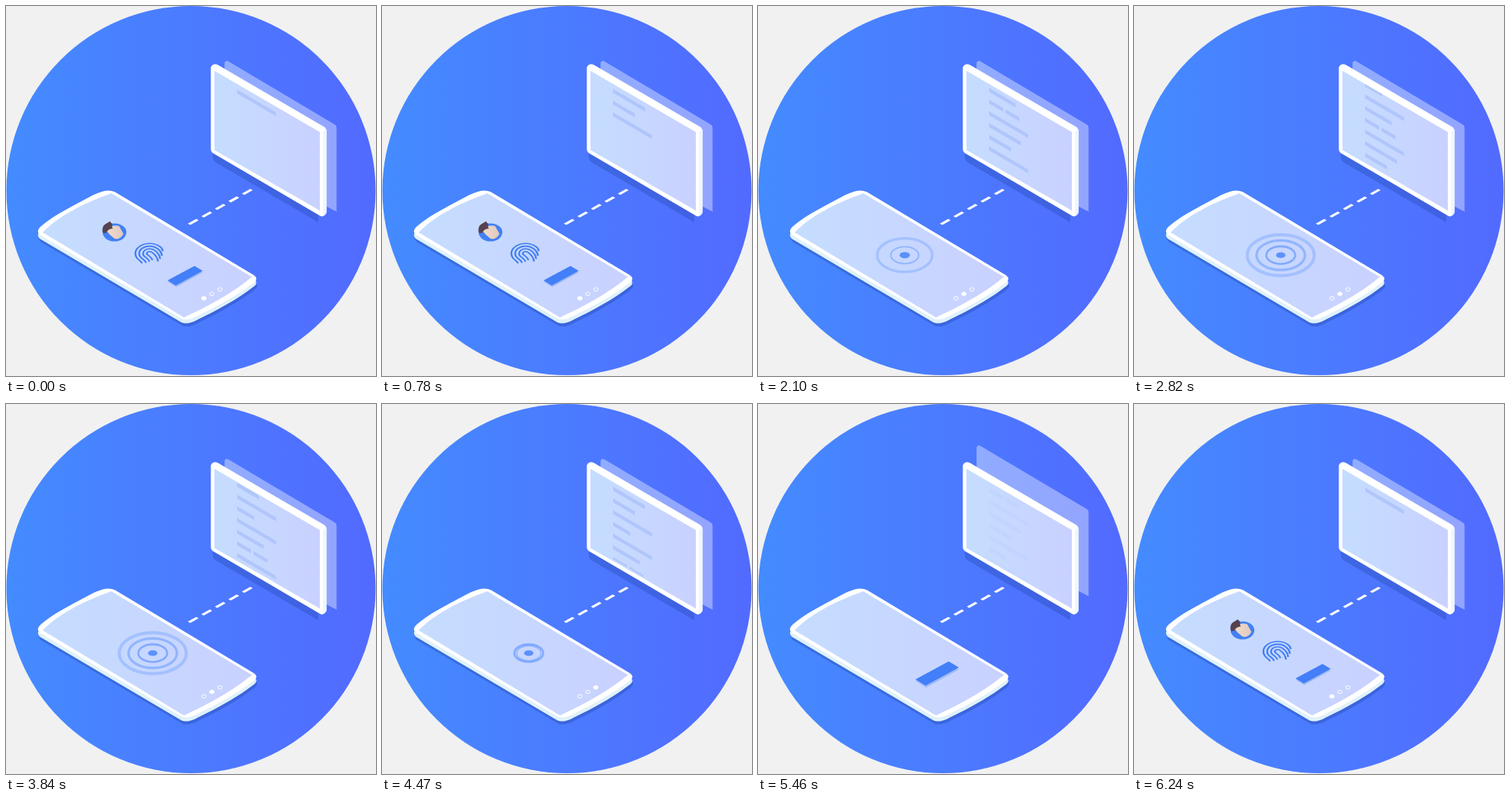
An HTML page that plays this animation: 474x474 px, repeating every 6.27 s.

```html
<!DOCTYPE html>
<html lang="en">
<head>
<meta charset="utf-8">
<title>Phone and screen</title>
<style>
html, body { margin: 0; width: 100%; height: 100%; overflow: hidden; background: #f1f1f1; }
svg { display: block; width: 100vw; height: 100vh; }
</style>
</head>
<body>
<svg viewBox="0 0 474 474">
  <defs>
    <linearGradient id="sky"><stop stop-color="#448bff"/><stop offset="1" stop-color="#526aff"/></linearGradient>
    <linearGradient id="glass"><stop stop-color="#c5ddff"/><stop offset="1" stop-color="#c9d1ff"/></linearGradient>
    <linearGradient id="skin"><stop stop-color="#f3dcc4"/><stop offset="1" stop-color="#dfc9c4"/></linearGradient>
    <path id="body" d="M43 293Q38 288 45 282C64 266 88 255 112 242Q130 233 140 238.500L317 344.500Q324 349 318 354C296 371 270 385 246 396.500Q233 404 225 400.500Z"/>
    <clipPath id="page"><path d="M294 99L348 130.300V229L294 197.700Z"/></clipPath>
  </defs>
  <circle cx="237" cy="236.500" r="236.500" fill="url(#sky)"/>

  <path d="M265 188L400 267V277L268 200Q264 197 265 188Z" fill="#1c3f9e" fill-opacity=".3"/>
  <path id="back" d="M280 180V73Q281 69 285 71L421.500 152Q423.500 153.500 423.500 156V263.500L411 257Z" fill="#fff" fill-opacity=".38"/>
  <path d="M262.400 183V79Q262.600 76 267 74.500Q269 74 272 75.800L407 154.500Q410.500 156.500 410.500 160V265Q409 268 405.500 269.500Q404 270 401 268L266 189Q262.400 187 262.400 183Z" fill="#fff"/>
  <path d="M406 161L410.500 158V265Q409 268 406 269Z" fill="#eef6ff"/>
  <path d="M267 83L402 161.500V262L267 184.500Z" fill="url(#glass)"/>
  <g clip-path="url(#page)"><g id="lines" fill="#b0c6fb"></g></g>

  <path id="dash" d="M0 0H98" transform="matrix(.84 -.468 .86 .5 234.500 279.700)" stroke="#fff" stroke-width="3.600"/>

  <use href="#body" y="9" x="1" fill="#1c3f9e" fill-opacity=".35"/>
  <use href="#body" y="5" fill="#dff1fb"/>
  <use href="#body" fill="#fff"/>
  <path d="M47 290C66 270 98 253 135 240L315 347C290 368 258 385 228 399Z" fill="url(#glass)"/>

  <g id="avatar">
    <ellipse cx="139" cy="290" rx="15.200" ry="11.500" fill="#4280f4"/>
    <path d="M128 287Q137 279 145 282L150.500 292Q146 300 139 298Q133 294 128 287Z" fill="url(#skin)"/>
    <path d="M124 290.500Q122 282 128 279L133 276L136 279Q135 283 137 285Q131 285 128 291Z" fill="#54434f"/>
  </g>
  <g id="finger">
    <g id="ridges" transform="matrix(.86 -.6 .86 .6 184 317)" fill="none" stroke="#417ff2" stroke-width="1.900" stroke-linecap="round"></g>
  </g>
  <g id="button">
    <path d="M207 353L241 335L252 341.500L218 360Z" fill="#9db9f4"/>
    <path d="M207 351.500L241.500 333L252 339.200L217.500 358Z" fill="#427ff8"/>
  </g>
  <g id="rings" fill="none" stroke="#4a85fa"></g>
  <g id="dots" stroke="#fff"></g>
</svg>
<script>
const LOOP = 6270, RESET = 5700;
const $ = id => document.getElementById(id);

function add(parent, tag, attrs) {
  const el = document.createElementNS('http://www.w3.org/2000/svg', tag);
  for (const k in attrs) el.setAttribute(k, attrs[k]);
  return parent.appendChild(el);
}

const ramp = (t, start, length) => Math.min(1, Math.max(0, (t - start) / length));
const shrink = (t, start, length) => 1 - ramp(t, start, length) ** 2;

// Grows from 0 to 1 and overshoots on the way
function pop(t, start, length, back = 1.7) {
  const u = ramp(t, start, length) - 1;
  return 1 + (back + 1) * u ** 3 + back * u ** 2;
}

const scaleAt = (el, x, y, s) =>
  el.setAttribute('transform', `translate(${x} ${y}) scale(${s}) translate(${-x} ${-y})`);

// Text lines, lowest first; one line of each cycle is two words
const WIDTHS = [50, 28, 41, 50, 18, 34, 50, 22], SPLIT = 4;
for (let i = 0; i < 13; i++) {
  const n = i % WIDTHS.length;
  for (let x = 0; x <= (n === SPLIT ? 21 : 0); x += 21)
    add($('lines'), 'rect', { x, y: -15 * i, width: WIDTHS[n], height: 5 });
}
const bar = $('lines').firstChild;
const scroll = t => 107 + 0.032 * t + 6 * (1 - Math.exp(-t / 600));

// Fingerprint: nested arches whose legs sweep to one side
for (let r = 3; r < 17; r += 4) {
  const leg = 0.85 * Math.sqrt(17 ** 2 - r ** 2);
  const sweep = `q0 ${leg * 0.6} ${-leg * 0.35} ${leg}`;
  add($('ridges'), 'path', { d: `M${r} 0${sweep}M${r} 0A${r} ${r} 0 0 0 ${-r} 0q0 ${leg * 0.4} ${-leg * 0.12} ${leg * 0.6}` });
}

// Rings from the outside in, the last one is the solid dot
const CX = 188, CY = 319.2;
const rings = [43, 31, 18.5, 6].map((r, i) => add($('rings'), 'ellipse', {
  cx: CX, cy: CY, rx: r, ry: r * 0.61, opacity: 0.28 + 0.13 * i + (i === 3 ? 0.18 : 0),
  'stroke-width': i === 3 ? 0 : 4 - 0.7 * i, fill: i === 3 ? '#4a85fa' : 'none'
}));

const dots = [0, 1, 2].map(i => {
  const x = 253.5 + 10.2 * i, y = 374.5 - 5.7 * i;
  return { x, y, el: add($('dots'), 'ellipse', { cx: x, cy: y, rx: 2.9, ry: 2.2, fill: '#fff' }) };
});

const DASH = 12.8, PITCH = 20.6;
$('dash').setAttribute('stroke-dasharray', `${DASH} ${PITCH - DASH}`);

function render(t) {
  const reset = t > RESET;
  const enter = pop(t, 6050, 185, 4.5);

  $('lines').setAttribute('transform', `matrix(1 .585 0 1 296 ${scroll(reset ? 0 : t)})`);
  $('lines').setAttribute('opacity', reset ? ramp(t, 6060, 120) : 1 - ramp(t, 5130, 430));
  bar.setAttribute('rx', reset ? 2 : 0);

  $('dash').setAttribute('stroke-dashoffset', -PITCH * ramp(t, 0, 630));
  $('back').setAttribute('transform', `translate(0 ${-20 * Math.sin(Math.PI * ramp(t, 5100, 540))})`);

  const button = t > 5000 ? pop(t, 5150, 450, 4) : shrink(t, 1540, 200);
  scaleAt($('avatar'), 139, 289.5, reset ? enter : shrink(t, 1440, 200));
  scaleAt($('finger'), 185, 317.5, reset ? enter : shrink(t, 1490, 200));
  scaleAt($('button'), 229.5, 346.5, button);

  rings.forEach((el, i) => {
    const start = i === 3 ? 1740 : 1950 + 60 * i;
    scaleAt(el, CX, CY, pop(t, start, 600) * shrink(t, 4080 + 250 * i, 200));
  });

  const active = reset ? 0 : ramp(t, 960, 180) + ramp(t, 4080, 180);
  dots.forEach(({ x, y, el }, i) => {
    scaleAt(el, x, y, reset ? enter : shrink(t, 4500, 400));
    el.setAttribute('fill-opacity', Math.max(0, 1 - Math.abs(active - i)));
  });
}

const start = performance.now();
function tick(now) {
  render(Math.max(0, now - start) % LOOP);
  requestAnimationFrame(tick);
}
render(0);
requestAnimationFrame(tick);
</script>
</body>
</html>
```
